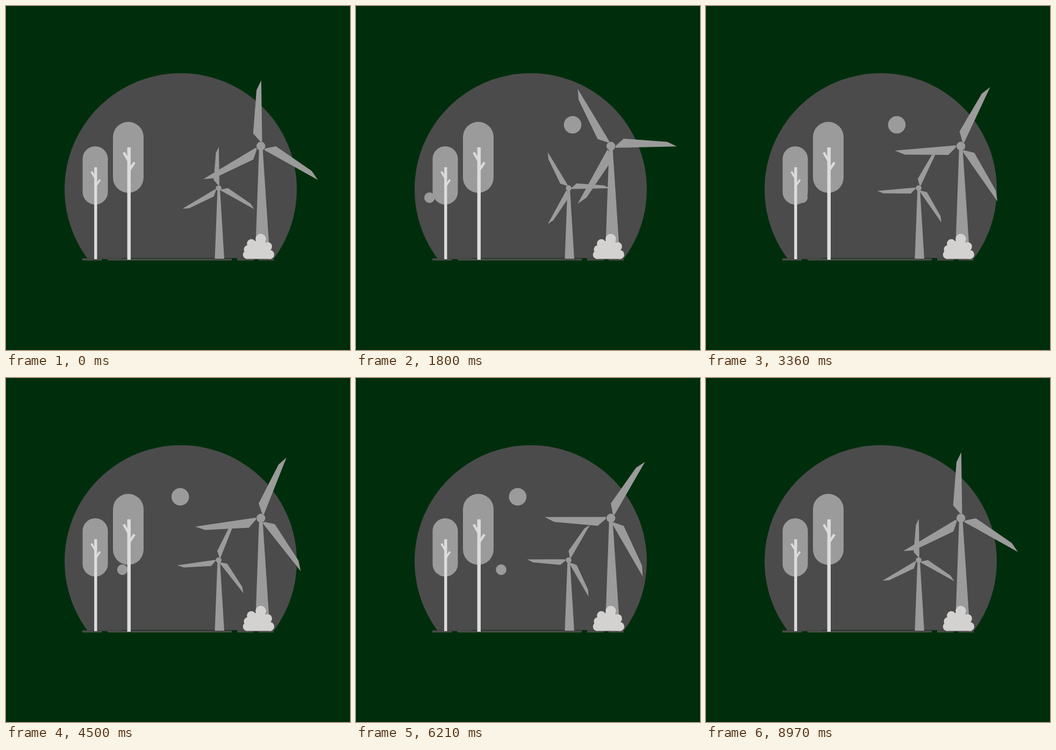
Recreate the animation shown at these times as an HTML page. Size 640 px wide and 640 px high, loop 9030 ms.

```html
<!DOCTYPE html>
<html lang="en">
<head>
<meta charset="utf-8">
<title>Wind park</title>
<style>
  html, body { margin: 0; height: 100%; overflow: hidden; background: #002e0c; }
  svg { display: block; width: 100vw; height: 100vh; }
</style>
</head>
<body>
<svg viewBox="0 0 640 640">
  <defs>
    <clipPath id="horizon"><path d="M0 0H640V469.4H0Z"/></clipPath>
    <path id="blade" d="M0 -123L-8.6 -105L-14.4 -24L-1 -9L2.5 -9Z"/>
    <g id="rotor">
      <use href="#blade"/>
      <use href="#blade" transform="rotate(120)"/>
      <use href="#blade" transform="rotate(240)"/>
    </g>
  </defs>

  <g fill="#4b4b4b">
    <circle cx="325" cy="341" r="216" clip-path="url(#horizon)"/>
    <path d="M142 469.6H498V473.6H470V471.4H461V473.6H430V469.6H420V473.6H190L188 471H178V473.6H142Z"/>
  </g>
  <path d="M216 469.4H420" stroke="#002e0c" stroke-width=".8"/>
  <path d="M420 469H430V473.6H420Z" fill="#002e0c"/>

  <g fill="#9b9b9b">
    <circle id="big" cy="221" r="16.3"/>
    <circle id="small" cy="356.6" r="9.8"/>
    <rect x="142.5" y="261" width="47" height="108.5" rx="23.5"/>
    <rect x="199" y="215.5" width="57" height="132" rx="28.5"/>
    <path d="M393.5 340H398L406 470H388.5Z"/>
    <path d="M471 262H477.3L491 469H463.6Z"/>
    <use class="spin" href="#rotor" data-place="translate(395.4 339) scale(.626)"/>
    <use class="spin" href="#rotor" data-place="translate(474 261.2)"/>
    <circle cx="395.6" cy="338.7" r="5.3"/>
    <circle cx="474.2" cy="260.7" r="8.2"/>
  </g>

  <g fill="none" stroke="#dcdcdc">
    <path d="M166.8 300V471" stroke-width="5.4"/>
    <path d="M158.8 308L167 321.5M175 323L167 334.5" stroke-width="3.6"/>
    <path d="M228.8 263V472" stroke-width="6.4"/>
    <path d="M219 272.5L229 290M239 291L229 306" stroke-width="4.5"/>
  </g>

  <g fill="#d3d2d0">
    <circle cx="474" cy="433.5" r="9.7"/>
    <circle cx="456.5" cy="442" r="8.3"/>
    <circle cx="450.5" cy="453" r="8"/>
    <circle cx="448.8" cy="462.6" r="8"/>
    <circle cx="487" cy="447.5" r="8"/>
    <circle cx="490.8" cy="462.4" r="8.3"/>
    <path d="M456 440L468 436H480L490 450L494 470.6H447L446 456Z"/>
  </g>
</svg>
<script>
const LOOP = 9030, END = 8970, STEP = 30;
const $ = id => document.getElementById(id);
const rotors = document.querySelectorAll('.spin');

// Slow start and long run-out: cubic-bezier(.5176, 0, .225, 1)
function ease(x) {
  let lo = 0, hi = 1;
  for (let i = 0; i < 30; i++) {
    const s = (lo + hi) / 2, r = 1 - s;
    if (3 * r * r * s * .5176 + 3 * r * s * s * .225 + s ** 3 < x) lo = s; else hi = s;
  }
  return lo * lo * (3 - 2 * lo);
}

// Turn of the rotors in degrees, with a slight gust in mid run
function turn(t) {
  const g = (t - 2300) / 3200;
  const gust = g > 0 && g < 1 ? 7.5 * Math.sin(2 * Math.PI * g) : 0;
  return 1200 * ease(t / END) + gust;
}

// Smooth curve through [time, value] keys
function curve(keys, t) {
  let i = 0;
  while (i < keys.length - 2 && t > keys[i + 1][0]) i++;
  const slope = (a, b) => (b[1] - a[1]) / (b[0] - a[0]);
  const at = j => slope(keys[Math.max(j - 1, 0)], keys[Math.min(j + 1, keys.length - 1)]);
  const [t0, v0] = keys[i], [t1, v1] = keys[i + 1];
  const h = t1 - t0, u = (t - t0) / h, r = 1 - u;
  return v0 * r * r * (1 + 2 * u) + v1 * u * u * (3 - 2 * u)
    + h * u * r * (at(i) * r - at(i + 1) * u);
}

const paths = {
  big: [[900, 430], [1800, 403], [3360, 355], [4500, 324.2], [5430, 308.5], [7080, 293.6], [7300, 292]],
  small: [[900, 112], [1800, 136.8], [3360, 179.3], [4500, 216.5], [5430, 247.5], [7080, 293.5], [7800, 309]]
};

function draw(now) {
  const t = Math.min(Math.floor(now % LOOP / STEP) * STEP, END);
  const angle = .4 + turn(t);
  for (const r of rotors) r.setAttribute('transform', `${r.dataset.place} rotate(${angle})`);
  for (const id in paths) {
    const keys = paths[id], shown = t >= keys[0][0] && t < keys[keys.length - 1][0];
    $(id).setAttribute('visibility', shown ? 'visible' : 'hidden');
    if (shown) $(id).setAttribute('cx', curve(keys, t));
  }
}

const start = performance.now();
function tick() {
  draw(performance.now() - start);
  requestAnimationFrame(tick);
}
tick();
</script>
</body>
</html>
```
